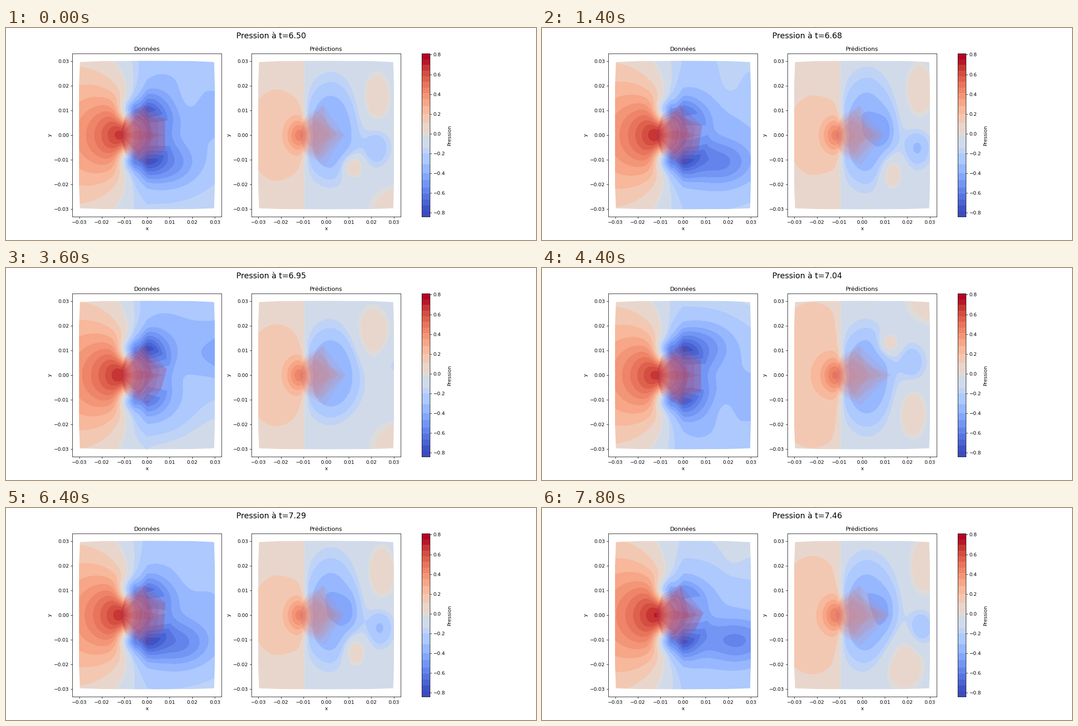
A matplotlib script for the animation above (8000 ms loop, 1183x473 px).

```python
import numpy as np
import matplotlib.pyplot as plt
from matplotlib.animation import FuncAnimation
from matplotlib.collections import PolyCollection
from matplotlib.patches import Polygon

W, H, DPI = 1183, 473, 80
FRAMES, STEP_MS = 40, 200
T0, DT, PERIOD = 6.503, 0.0246, 0.155
VMIN, VMAX = -0.84, 0.81
BOTTOM, HEIGHT = 0.11, 363.7 / H

plt.rcParams.update({
    "font.family": "DejaVu Sans", "font.size": 9.86,
    "axes.titlesize": 11.83, "axes.titlepad": 5.9, "axes.labelpad": 3.94,
    "axes.linewidth": 0.79,
    "xtick.major.size": 3.45, "ytick.major.size": 3.45,
    "xtick.major.width": 0.79, "ytick.major.width": 0.79,
    "xtick.major.pad": 3.45, "ytick.major.pad": 3.45,
})

# Band edges: wider steps around zero, regular steps towards both ends.
LEVELS = np.concatenate([
    np.linspace(VMIN, -0.61, 5)[:-1],
    [-0.61, -0.545, -0.47, -0.4, -0.31, -0.2, -0.145, -0.025],
    [0.0, 0.11, 0.2, 0.28, 0.35],
    np.linspace(0.41, VMAX, 8),
])
MIDS = (LEVELS[:-1] + LEVELS[1:]) / 2
SHARE = (MIDS - VMIN) / (VMAX - VMIN)
COLORS = plt.get_cmap("coolwarm")(np.clip(0.5 + (SHARE - 0.5) * 1.08, 0, 1))

X, Y = np.meshgrid(np.linspace(-0.031, 0.031, 220), np.linspace(-0.031, 0.031, 220))


def gauss(cx, cy, sx, sy):
    return np.exp(-0.5 * (((X - cx) / sx) ** 2 + ((Y - cy) / sy) ** 2))


def sigmoid(z):
    return 1 / (1 + np.exp(-np.clip(z, -40, 40)))


def cyclic(phase, keys, values):
    return np.interp(phase, keys, values, period=1)


def measured(phase):
    """Stagnation zone, side lobes and alternating shed vortices."""
    a = 0.011
    r2 = np.maximum((X ** 2 + Y ** 2) / a ** 2, 1.0)
    q = (2 * np.maximum(-X / a, 0) - 1) / r2
    down = sigmoid((X + 0.002) / 0.003)
    shelter = 1 - 0.6 * down * np.exp(-(Y / 0.009) ** 2)
    p = 0.8 * np.where(q > 0, q, 0.45 * q * shelter) - 0.11
    p -= 0.045 * (1 - down) * (Y / 0.03) ** 2

    side = np.tanh(Y / 0.008)
    p -= down * (0.06 + 0.09 * side * np.cos(2 * np.pi * (phase + 0.13)))
    p -= 0.12 * down * np.exp(-(Y / 0.018) ** 2)
    p += 0.02 * (1 - np.cos(4 * np.pi * phase))

    for sign, ph in ((-1, phase), (1, phase + 0.5)):
        # Steep pressure drop at the shoulder, then the attached lobe.
        p -= 0.45 * gauss(-0.008, sign * 0.0095, 0.0032, 0.0035)
        lobe = 0.13 + 0.09 * np.sin(2 * np.pi * ph)
        p -= lobe * gauss(-0.0005, sign * 0.0125, 0.005, 0.0045)
        age = (ph + 0.3) % 1
        amp = 0.26 * min(age / 0.36, 1)
        cy = 0.0132 - 0.012 * (age - 0.3)
        p -= amp * gauss(0.001 + 0.1 * age ** 2, sign * cy, 0.0105, 0.0072)
        drift = (ph + 0.5) % 1 - 0.5
        weak = 0.08 * max(np.cos(2 * np.pi * drift), 0)
        p += weak * gauss(0.018 + 0.02 * drift, -sign * (0.014 + 0.05 * drift),
                          0.004, 0.006)
    return p


def predicted(phase):
    """Smoother front, halo around the body and a few drifting patches."""
    wide = cyclic(phase, [0, 0.063, 0.12, 0.19, 0.49, 0.7],
                  [0.066, 0.06, 0.06, 0.086, 0.12, 0.08])
    left = (0.065 + wide * gauss(-0.022, 0, 0.014, 0.021)
            + 0.33 * gauss(-0.0113, 0, 0.0046, 0.0052))

    right = np.full_like(X, -0.1)
    wave = 2 * np.pi * phase
    top = 0.0205 + 0.001 * np.cos(wave) + 0.002 * np.sin(2 * wave)
    bottom = 0.0195 - 0.0015 * np.cos(wave) + 0.0015 * np.sin(2 * wave)
    reach = np.where(Y > 0, top, bottom)
    width = np.where(X > 0.002, 0.0125 + 0.0015 * np.sin(wave) ** 2, 0.0125)
    r = np.hypot((X - 0.002) / width, Y / reach)
    right -= 0.3 * np.exp(-0.5 * (np.maximum(r - 0.4, 0) / 0.41) ** 2)

    swell = max(np.sin(2 * wave), 0)
    tilt = np.sign(np.cos(wave - 0.7))
    right -= 0.12 * swell * gauss(0.0115, 0.002 * tilt, 0.0028, 0.006)

    for sign, ph in ((-1, phase % 1), (1, (phase + 0.5) % 1)):
        amp = 0.24 * np.sqrt(max(np.cos(2 * np.pi * (ph - 0.12)), 0))
        shift = (ph + 0.5) % 1 - 0.5
        right -= amp * gauss(0.0222 + 0.02 * shift, sign * 0.005, 0.004, 0.0052)

        keys = [0, 0.11, 0.19, 0.5, 0.69, 0.88]
        cx = np.interp(ph, keys, [0.0115, 0.0125, 0.0185, 0.0225, 0.0275, 0.033])
        cy = np.interp(ph, keys, [0.0125, 0.0145, 0.0195, 0.0155, 0.02, 0.030])
        sx = np.interp(ph, keys, [0.0034, 0.0038, 0.0075, 0.0048, 0.0052, 0.011])
        sy = np.interp(ph, keys, [0.0034, 0.0055, 0.0095, 0.0082, 0.010, 0.008])
        amp = np.interp(ph, [0, 0.19], [0.26, 0.17])
        right += amp * gauss(cx, sign * cy, sx, sy)
        # The next patch appears while the previous one leaves by the corner.
        if ph > 0.88:
            fresh = (ph - 0.88) / 0.12
            right += 0.26 * fresh * gauss(0.0115, sign * 0.0125, 0.0034, 0.0034)
        elif ph < 0.12:
            right += 0.17 * (1 - ph / 0.12) * gauss(0.033, sign * 0.030, 0.011, 0.008)

    edge = -0.0098 + 0.002 * np.exp(-(Y / 0.006) ** 2)
    g = sigmoid((X - edge) / 0.0008)
    return left * (1 - g) + right * g


def fan(outline, scales):
    """Nested copies of an outline that share its first point."""
    pts = np.array(outline)
    return [pts[0] + k * (pts - pts[0]) for k in scales]


def measured_body(phase):
    c = 0.5 + 0.5 * np.cos(4 * np.pi * phase)
    s = 1 if (phase + 0.15) % 1 < 0.5 else -1
    nose, upper, lower = (-0.0118, 0), (-0.001, s * 0.0122), (0, -s * 0.0122)
    tip = (0.0092 - 0.0012 * c, s * 0.0065 * c)
    low = (0.005 + 0.003 * c, -s * 0.006)
    outline = [nose, (-0.0095, s * 0.0083), upper, tip, low, lower,
               (-0.0095, -s * 0.008)]
    return fan(outline, (1, 0.85, 0.68, 0.5)) + [
        np.array([nose, upper, (0.003, -s * 0.001), (-0.004, -s * 0.008)]),
        np.array([nose, (-0.003, s * 0.0085), tip, low, (-0.003, -s * 0.008)]),
        np.array([nose, (-0.004, 0.002), (0.008, 0), (-0.004, -0.002)]),
    ]


def predicted_body(phase):
    tip = cyclic(phase, [0, 0.07, 0.12, 0.19, 0.49, 0.75],
                 [0.008, 0.0073, 0.010, 0.0125, 0.0125, 0.009])
    nose, upper, lower = (-0.0118, 0), (-0.0012, 0.012), (-0.0005, -0.0122)
    outline = [nose, (-0.0092, 0.0078), upper, (tip, 0), lower, (-0.0095, -0.0078)]
    return fan(outline, (1, 0.82, 0.65, 0.42)) + [
        np.array([nose, (-0.005, 0.006), (tip, 0.0005), (-0.002, -0.0095)]),
        np.array([nose, (-0.002, 0.0085), (tip - 0.003, 0), (-0.006, -0.005)]),
        np.array([(-0.009, 0.005), upper, (0.002, -0.001), (-0.004, -0.009)]),
    ]


class Panel:
    def __init__(self, fig, left, title, field, body, tint, alpha):
        self.field, self.body = field, body
        self.ax = ax = fig.add_axes([left / W, BOTTOM, 332.8 / W, HEIGHT])
        ax.set(xlim=(-0.033, 0.033), ylim=(-0.033, 0.033), title=title,
               xlabel="x", ylabel="y",
               xticks=np.linspace(-0.03, 0.03, 7), yticks=np.linspace(-0.03, 0.03, 7))
        border = [(-0.0297, 0.0296), (-0.02, 0.03), (0, 0.0301), (0.02, 0.03),
                  (0.0297, 0.0296), (0.03, 0.02), (0.03, -0.02), (0.0297, -0.0296),
                  (0.02, -0.0299), (0, -0.03), (-0.02, -0.0299), (-0.0297, -0.0296),
                  (-0.0301, -0.02), (-0.0301, 0.02)]
        self.clip = ax.add_patch(Polygon(border, fc="none", ec="none"))
        self.shade = ax.add_collection(PolyCollection(
            body(0), facecolors=tint, edgecolors="none", alpha=alpha, zorder=2))
        self.bands = None

    def draw(self, phase):
        if self.bands is not None:
            self.bands.remove()
        z = np.clip(self.field(phase), VMIN + 1e-4, VMAX - 1e-4)
        self.bands = self.ax.contourf(X, Y, z, levels=LEVELS, colors=COLORS, zorder=1)
        self.bands.set_clip_path(self.clip)
        self.shade.set_verts(self.body(phase))


fig = plt.figure(figsize=(W / DPI, H / DPI), dpi=DPI, facecolor="white")
heading = fig.suptitle("", fontsize=15.77)
panels = [
    Panel(fig, 148.4, "Données", measured, measured_body, "#bc3448", 0.15),
    Panel(fig, 548.2, "Prédictions", predicted, predicted_body, "#dc7c74", 0.13),
]

bar = fig.add_axes([927.8 / W, BOTTOM, 18.2 / W, HEIGHT])
bar.pcolormesh([0, 1], LEVELS, COLORS[:, None, :3])
bar.set(xticks=[], ylim=(VMIN, VMAX), yticks=np.linspace(-0.8, 0.8, 9))
bar.yaxis.tick_right()
bar.yaxis.set_label_position("right")
bar.set_ylabel("Pression")


def update(i):
    t = T0 + DT * i
    heading.set_text(f"Pression à t={t:.2f}")
    for panel in panels:
        panel.draw((t - T0) / PERIOD % 1)
    return []


anim = FuncAnimation(fig, update, frames=FRAMES, interval=STEP_MS,
                     init_func=lambda: [], repeat=True, repeat_delay=0)
plt.show()
```
